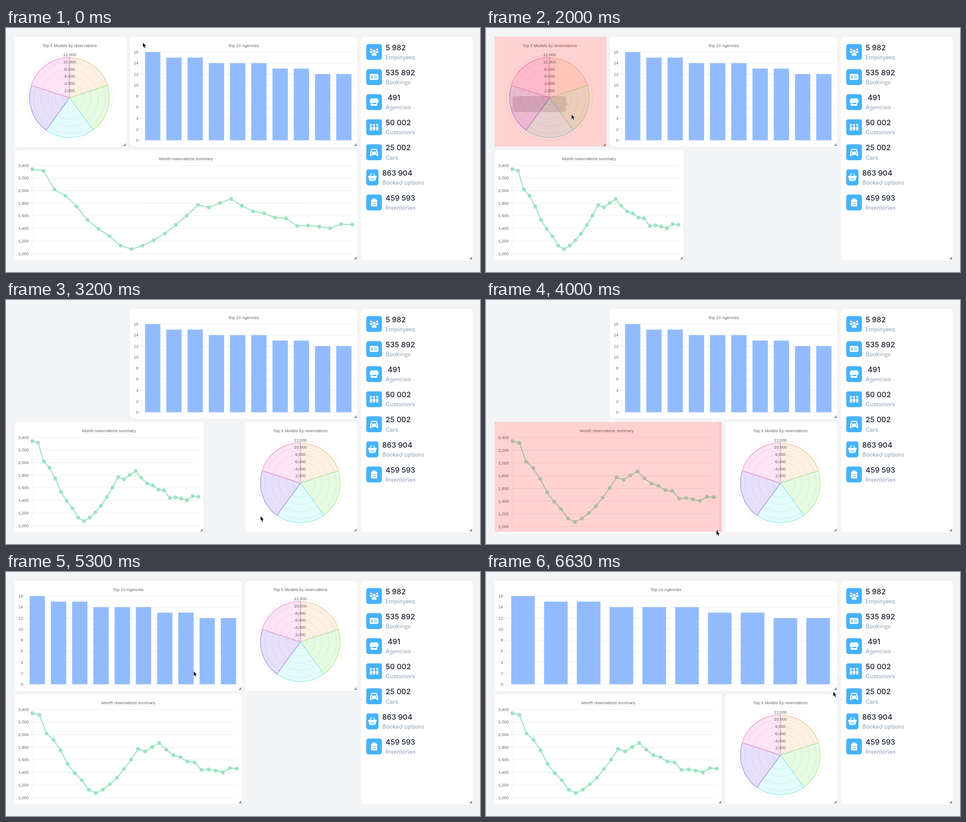
Write an HTML page with a canvas that moves like this. It is 1043 px wide and 537 px high and loops after 6.76 s.

```html
<!DOCTYPE html>
<html lang="en">
<head>
<meta charset="utf-8">
<title>Dashboard</title>
<style>
  html, body { margin: 0; width: 100%; height: 100%; overflow: hidden; background: #f3f4f6; }
  canvas { display: block; width: 1043px; height: 537px; }
</style>
</head>
<body>
<canvas id="stage"></canvas>
<script>
const WIDTH = 1043, HEIGHT = 537, LOOP = 6760;
const COL = 84.65, GAP = 8, LEFT = 19, ROW1 = 19, ROW2 = 268.5, CARD_H = 242;
const CHART_FONT = '9.2px "Liberation Sans", Arial, sans-serif';
const RED = 'rgba(255,0,0,.175)';

const canvas = document.getElementById('stage');
const ctx = canvas.getContext('2d');
const ratio = window.devicePixelRatio || 1;
canvas.width = WIDTH * ratio;
canvas.height = HEIGHT * ratio;

const colX = n => LEFT + n * COL;
const colW = n => n * COL - GAP;
const linear = p => p;
const settle = p => 1 - (1 - p) ** 2.3;

// keys: [time, value, value...]; returns the values at time t
function track(keys, t, ease = linear) {
  if (t <= keys[0][0]) return keys[0].slice(1);
  for (let i = 1; i < keys.length; i++) {
    const a = keys[i - 1], b = keys[i];
    if (t < b[0]) {
      const p = ease((t - a[0]) / (b[0] - a[0]));
      return a.slice(1).map((v, k) => v + (b[k + 1] - v) * p);
    }
  }
  return keys[keys.length - 1].slice(1);
}

// ---------- motion ----------
const cursorKeys = [
  [100, 301, 32], [500, 768, 506], [1250, 428, 506], [1350, 428, 506],
  [1600, 285, 290], [1850, 188, 190], [2000, 188, 190], [2100, 246, 206],
  [2300, 420, 335], [2500, 611, 493.5], [2700, 688, 452], [2850, 696, 439.5],
  [3000, 690, 444], [3400, 430, 507], [3500, 430, 506], [4000, 507, 507],
  [4100, 508, 505], [4300, 406, 127], [4400, 406, 127], [4600, 189, 125.5],
  [4800, 182.5, 125], [4950, 180, 126], [5100, 210, 140], [5400, 514, 257],
  [5450, 516, 258], [5800, 649, 277], [6200, 772, 266], [6400, 766, 264], [6500, 764, 263]
];
const lineRight = [[500, 773], [1250, 432], [1350, 434.5], [3500, 434.5], [4000, 512.5], [4100, 519]];
const lineBottom = [[3500, 510.5], [4000, 512.5], [4100, 510.5]];
const lineY = [[2080, ROW2], [2280, ROW2 + 499], [2388, ROW2 + 499], [2588, ROW2]];
const barY = [[2080, ROW1], [2280, ROW2], [2382, ROW2], [2582, ROW1],
  [4400, ROW1], [4800, 17], [4950, 18], [5050, ROW1]];
const barX = [[4400, colX(3)], [4600, 56], [4800, 49.5], [4950, 47], [5050, LEFT]];
const barW = [[5450, colW(6)], [5800, 624], [6200, 749], [6300, colW(9)]];
const barH = [[5450, CARD_H], [5800, 259], [6200, 247], [6300, CARD_H]];
const polarY = [[4580, ROW2], [4780, ROW1], [5716, ROW1], [5916, ROW2]];
const dropZone = [[2040, LEFT, ROW1], [2120, colX(1), ROW1], [2300, colX(1), ROW1],
  [2380, colX(2), ROW1], [2423, colX(2), ROW1], [2523, colX(5), ROW2],
  [2560, colX(5), ROW2], [2660, colX(6), ROW2]];
const polarTip = [[1900, 0], [2000, .15], [2200, 1], [2800, 1], [3000, 0]];
const ghostTip = [[5600, 0], [5700, .3], [5800, .1], [5900, 0]];
const barTip = [[4310, 0], [4500, 1], [4950, 1], [5150, 0]];

const during = (t, a, b) => t >= a && t < b;

function sceneAt(t) {
  const late = t - 25;   // charts redraw slightly after their cards resize
  const cursor = track(cursorKeys, t);
  const ly = track(lineY, t, settle)[0];
  const line = {
    x: LEFT, y: ly,
    w: track(lineRight, t)[0] - LEFT, h: track(lineBottom, t)[0] - ROW2,
    cw: track(lineRight, t)[0] - LEFT, ch: track(lineBottom, t)[0] - ROW2,
    draw: drawLine
  };
  const bar = {
    x: track(barX, t)[0], y: track(barY, t, t < 3000 ? settle : linear)[0],
    w: track(barW, t)[0], h: track(barH, t)[0],
    cw: track(barW, late)[0], ch: track(barH, late)[0],
    tip: track(barTip, t)[0], draw: drawBars
  };
  const polar = { x: LEFT, y: ROW1, w: colW(3), h: CARD_H, draw: drawPolar,
    tip: track(polarTip, t)[0], ghost: track(ghostTip, t)[0] };
  if (t >= 2850) {
    polar.x = colX(6);
    polar.y = track(polarY, t, settle)[0];
  } else if (t > 2000) {
    polar.x += cursor[0] - 188;
    polar.y += cursor[1] - 190;
  }

  const snapW = w => colW(Math.round((w + GAP) / COL));
  let zone = null, active = null;
  if (during(t, 500, 1300) || during(t, 3500, 4100)) zone = [LEFT, ROW2, snapW(line.w), CARD_H];
  else if (during(t, 1900, 2850)) {
    zone = [...track(dropZone, t, settle), colW(3), CARD_H];
    if (t > 2000) active = polar;
  } else if (during(t, 4400, 4950)) {
    zone = [colX(Math.round((bar.x - LEFT) / COL)), ROW1, colW(6), CARD_H];
    active = bar;
  } else if (during(t, 5450, 6250)) zone = [LEFT, ROW1, snapW(bar.w), CARD_H];

  return { cards: [polar, line, bar], zone, active, cursor, resizing: during(t, 5450, 6250) };
}

// ---------- drawing helpers ----------
function roundBox(x, y, w, h, r, fill) {
  ctx.beginPath();
  ctx.roundRect(x, y, w, h, r);
  ctx.fillStyle = fill;
  ctx.fill();
}
function text(str, x, y, { align = 'left', color = '#666', font = CHART_FONT } = {}) {
  ctx.font = font;
  ctx.textAlign = align;
  ctx.textBaseline = 'middle';
  ctx.fillStyle = color;
  ctx.fillText(str, x, y + .5);
}
function stroke(color, width) {
  ctx.strokeStyle = color;
  ctx.lineWidth = width;
  ctx.stroke();
}
function segment(x1, y1, x2, y2, color, width = .8) {
  ctx.beginPath();
  ctx.moveTo(x1, y1);
  ctx.lineTo(x2, y2);
  stroke(color, width);
}
function poly(points, fill) {
  ctx.beginPath();
  points.forEach(p => ctx.lineTo(...p));
  ctx.closePath();
  ctx.fillStyle = fill;
  ctx.fill();
}
function disc(x, y, r, fill) {
  ctx.beginPath();
  ctx.arc(x, y, r, 0, 2 * Math.PI);
  ctx.fillStyle = fill;
  ctx.fill();
}
function drawCard(c) {
  roundBox(c.x, c.y, c.w, c.h, 7, '#fff');
  if (c.draw) c.draw(c);
  const x = c.x + c.w - 2.5, y = c.y + c.h - 2.5;
  ctx.beginPath();
  ctx.moveTo(x, y - 4);
  ctx.lineTo(x, y);
  ctx.lineTo(x - 4, y);
  stroke('#555', 1.5);
}
function tooltip(x, y, w, alpha, side, swatch, title, body) {
  if (alpha <= 0) return;
  ctx.save();
  ctx.globalAlpha = alpha;
  const dark = 'rgba(0,0,0,.8)', h = 35;
  roundBox(x, y, w, h, 4.5, dark);
  const edge = side > 0 ? x + w : x;
  if (side) poly([[edge, y + 13.5], [edge + side * 4, y + 17.5], [edge, y + 21.5]], dark);
  if (title && alpha > .3) {
    text(title, x + 4.5, y + 9.5, { color: '#fff', font: 'bold ' + CHART_FONT });
    ctx.fillStyle = '#fff';
    ctx.fillRect(x + 4.5, y + 20.5, 10, 10);
    ctx.fillStyle = swatch;
    ctx.fillRect(x + 5.5, y + 21.5, 8, 8);
    text(body, x + 15.5, y + 25, { color: '#fff' });
  }
  ctx.restore();
}

// ---------- charts ----------
function axes(c, { title, min, max, step, labelX, plotX, padRight }) {
  const top = c.y + 34, bottom = c.y + c.ch - 14;
  const toY = v => bottom - (v - min) / (max - min) * (bottom - top);
  text(title, c.x + c.cw / 2, c.y + 19.5, { align: 'center' });
  for (let v = min; v <= max; v += step) {
    segment(c.x + plotX - 6, toY(v), c.x + c.cw - padRight, toY(v), '#e6e7e9');
    text(v.toLocaleString('en-US'), c.x + labelX, toY(v), { align: 'right' });
  }
  segment(c.x + plotX, top, c.x + plotX, bottom, '#eeeff0', .7);
  return toY;
}

const monthly = [2340, 2315, 2018, 1917, 1749, 1535, 1392, 1276, 1125, 1072, 1126, 1212, 1317, 1454, 1605,
  1773, 1734, 1803, 1868, 1759, 1673, 1640, 1572, 1558, 1439, 1446, 1428, 1403, 1468, 1460];
function drawLine(c) {
  const toY = axes(c, { title: 'Month reservations summary', min: 1000, max: 2400, step: 200,
    labelX: 31, plotX: 39, padRight: 10 });
  const span = c.cw - 39 - 11;
  const points = monthly.map((v, i) => [c.x + 39 + span * i / (monthly.length - 1), toY(v)]);
  ctx.beginPath();
  points.forEach(p => ctx.lineTo(...p));
  ctx.lineJoin = 'round';
  stroke('#9be3c1', 2.3);
  points.forEach(p => disc(...p, 4.1, '#9be3c1'));
}

const agencies = [16, 15, 15, 14, 14, 14, 13, 13, 12, 12];
function drawBars(c) {
  const toY = axes(c, { title: 'Top 10 Agencies', min: 0, max: 16, step: 2,
    labelX: 18.5, plotX: 26.5, padRight: 5 });
  const pitch = (c.cw - 26.5 - 6) / agencies.length;
  agencies.forEach((v, i) => {
    ctx.fillStyle = i === 2 && c.tip > .2 ? '#629efd' : '#92bbfd';
    ctx.fillRect(c.x + 26.5 + pitch * (i + .14), toY(v), pitch * .72, toY(0) - toY(v));
  });
  tooltip(c.x + 148.5, c.y + 28, 83, c.tip, -1, '#92bbfd', 'NOISY-LE-SEC', 'Reservation: 15');
}

const slices = [
  ['#fdf0e2', '#eccda4'], ['#e6fae2', '#b7ec9f'], ['#e3fcfb', '#9eeee9'],
  ['#e6e0fa', '#a79bea'], ['#fbe4f5', '#ea9bd6']
];
const models = [11180, 11109, 11130, 11160, 11260];
function drawPolar(c) {
  const cx = c.x + 121, cy = c.y + 134.5, unit = 15.75 / 2000;
  text('Top 5 Models by reservations', cx, c.y + 19.5, { align: 'center' });
  const sweep = 2 * Math.PI / 5;
  slices.forEach(([fill, border], i) => {
    const hot = i === 1 && c.tip > .5;
    const from = -Math.PI / 2 + i * sweep;
    ctx.beginPath();
    ctx.moveTo(cx, cy);
    ctx.arc(cx, cy, models[i] * unit, from, from + sweep);
    ctx.closePath();
    ctx.fillStyle = hot ? '#dcfdd2' : fill;
    ctx.fill();
    stroke(hot ? '#83f567' : border, 1.5);
  });
  for (let v = 2000; v <= 12000; v += 2000) {
    ctx.beginPath();
    ctx.arc(cx, cy, v * unit, 0, 2 * Math.PI);
    stroke('rgba(0,0,0,.09)', .8);
    text(v.toLocaleString('en-US'), cx, cy - v * unit, { align: 'center' });
  }
  tooltip(c.x + 39.5, c.y + 131, 118, c.tip, 1, '#c9f7b8', 'Zorvelles B6 - Automatic', 'Reservations: 11,109');
  tooltip(c.x + 52, c.y + 157, 143, c.ghost, 0);
}

// ---------- statistics panel; icons are drawn around their centre ----------
const WHITE = '#fff', BLUE = '#47b2ff';
function person(x, y, r, w, h) {
  disc(x, y, r, WHITE);
  roundBox(x - w / 2, y + r + 1, w, h, [w / 2, w / 2, 1, 1], WHITE);
}
const icons = {
  users() { person(-6.5, -5, 2.4, 6.5, 4); person(6.5, -5, 2.4, 6.5, 4); disc(0, -2, 4, BLUE); person(0, -2, 3.1, 11, 6); },
  check() {
    roundBox(-9.5, -6.5, 19, 13, 2, WHITE);
    text('$', -5, 0, { align: 'center', color: BLUE, font: 'bold ' + CHART_FONT });
    segment(0, -2, 7, -2, BLUE, 1.5);
    segment(0, 2, 7, 2, BLUE, 1.5);
  },
  store() {
    poly([[-7, -8], [7, -8], [10, -2], [-10, -2]], WHITE);
    for (let x = -7.5; x <= 7.5; x += 5) disc(x, -1.5, 2.6, WHITE);
    roundBox(-7.5, 0, 15, 8, 1, WHITE);
    roundBox(-5, 2, 10, 2.5, 0, BLUE);
  },
  group() { [-7, 7, 0].forEach(x => { person(x, -5, 2.3, 5.5, 7); roundBox(x - 1.7, 2, 3.4, 6, 1, WHITE); }); },
  car() {
    poly([[-5.5, -7.5], [5.5, -7.5], [8, -1], [-8, -1]], WHITE);
    poly([[-4.3, -5.2], [4.3, -5.2], [5.5, -1.5], [-5.5, -1.5]], BLUE);
    roundBox(-8.7, -1.5, 17.4, 7.5, 2, WHITE);
    roundBox(-8.7, 4, 3, 4.5, 1, WHITE);
    roundBox(5.7, 4, 3, 4.5, 1, WHITE);
    disc(-5.5, 2, 1.3, BLUE);
    disc(5.5, 2, 1.3, BLUE);
  },
  basket() {
    segment(-6, -1.5, -2.5, -8.5, WHITE, 1.8);
    segment(6, -1.5, 2.5, -8.5, WHITE, 1.8);
    roundBox(-10, -2.8, 20, 2.6, 1.2, WHITE);
    poly([[-8.5, -.5], [8.5, -.5], [6.5, 8], [-6.5, 8]], WHITE);
    [-3.5, 0, 3.5].forEach(x => segment(x, 1.5, x, 6, BLUE, 1.3));
  },
  clipboard() {
    roundBox(-6.5, -6.5, 13, 15.5, 2, WHITE);
    roundBox(-3, -9, 6, 5, 2, WHITE);
    disc(0, -6.3, 1, BLUE);
    [0, 4].forEach(y => { disc(-3.3, y, .9, BLUE); segment(-1, y, 4, y, BLUE, 1.3); });
  }
};
const stats = [
  ['5 982', 'Employees', 'users'], ['535 892', 'Bookings', 'check'], ['491', 'Agencies', 'store'],
  ['50 002', 'Customers', 'group'], ['25 002', 'Cars', 'car'],
  ['863 904', 'Booked options', 'basket'], ['459 593', 'Inventories', 'clipboard']
];
function drawStats() {
  drawCard({ x: colX(9), y: ROW1, w: colW(3), h: 491.5 });
  stats.forEach(([value, label, icon], i) => {
    const y = 35.3 + i * 55.2, w = icon === 'basket' ? 27 : 34.5;
    const x = 792.7 + w + 8;
    roundBox(792.7, y, w, 35, 5, BLUE);
    ctx.save();
    ctx.translate(792.7 + w / 2, y + 17.3);
    icons[icon]();
    ctx.restore();
    text(value, x + (icon === 'store' ? 4.5 : 0), y + 8, { color: '#1a202c', font: '500 16.3px Inter, sans-serif' });
    text(label, x, y + 29.3, { color: '#a0aec0', font: '500 12.5px Inter, sans-serif' });
  });
}

// ---------- pointer ----------
function drawCursor([x, y], resizing) {
  ctx.save();
  ctx.translate(x, y);
  if (resizing) {
    segment(-3, -3, 3, 3, '#111', 1.6);
    poly([[-4, -4], [0, -4], [-4, 0]], '#111');
    poly([[4, 4], [0, 4], [4, 0]], '#111');
  } else {
    poly([[0, 0], [0, 11], [2.5, 8.8], [4.3, 12.8], [6.2, 12], [4.5, 8], [7.8, 8]], '#000');
    stroke('#fff', .7);
  }
  ctx.restore();
}

function render(t) {
  const { cards, zone, active, cursor, resizing } = sceneAt(t);
  const drawZone = () => {
    if (!zone) return;
    ctx.fillStyle = RED;
    ctx.fillRect(...zone);
  };
  ctx.setTransform(ratio, 0, 0, ratio, 0, 0);
  ctx.fillStyle = '#f3f4f6';
  ctx.fillRect(0, 0, WIDTH, HEIGHT);
  drawStats();
  cards.filter(c => c !== active).forEach(drawCard);
  drawZone();
  if (active) drawCard(active);
  drawCursor(cursor, resizing);
}

// the picture advances in steps of 100 ms, with a few longer holds
function stepTime(ms) {
  if (ms >= 6630) return 6630;
  const t = Math.min(6500, Math.floor(ms / 100) * 100);
  return t === 100 || t === 800 ? t - 100 : t;
}
const start = performance.now();
function frame() {
  render(stepTime((performance.now() - start) % LOOP));
  requestAnimationFrame(frame);
}
frame();
</script>
</body>
</html>
```
